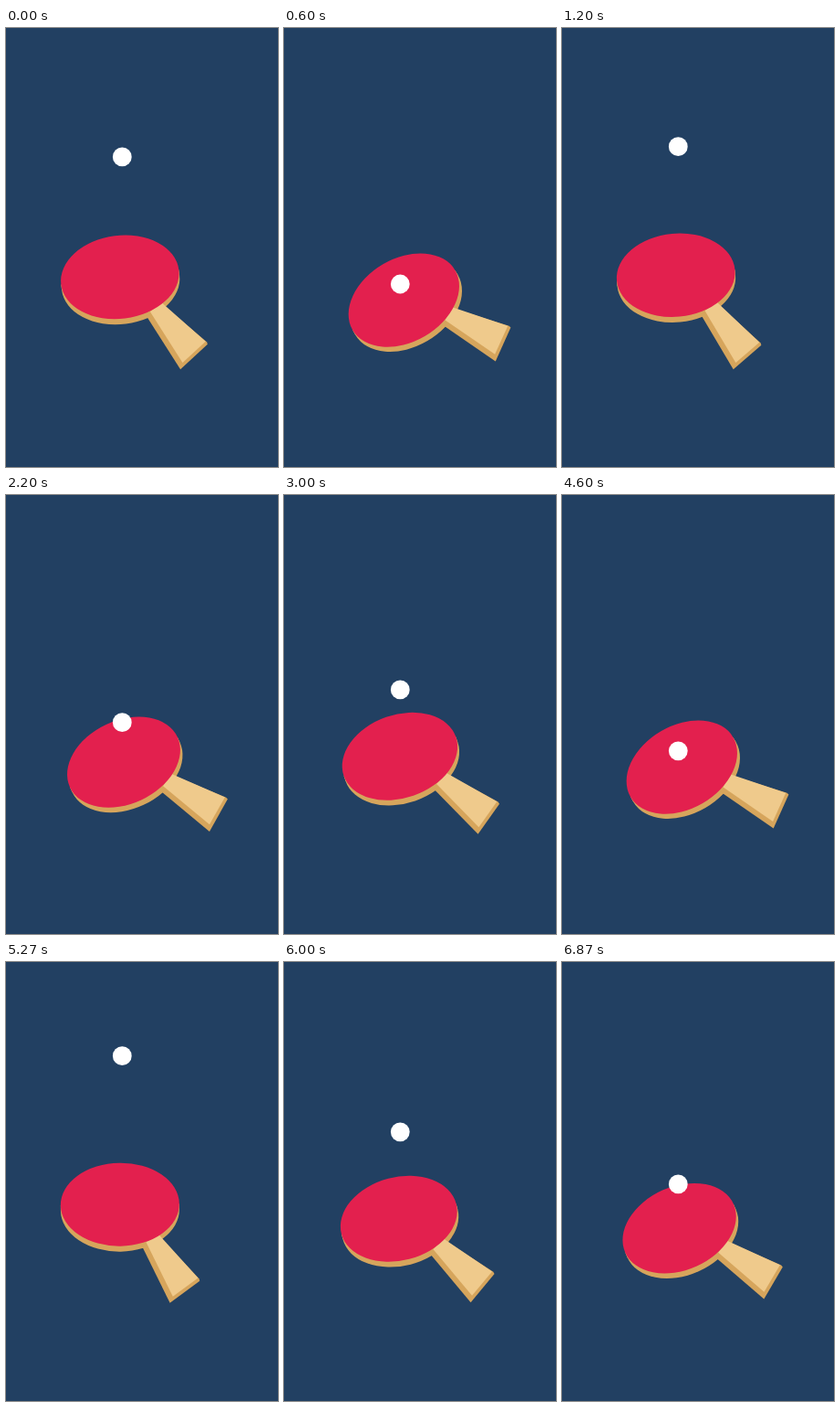
An HTML page that plays this animation: 298 by 480 pixels, repeating every 6.94 s.

```html
<!DOCTYPE html>
<html lang="en">
<head>
<meta charset="utf-8">
<title>Table tennis bounce</title>
<style>
  html, body { margin: 0; width: 100%; height: 100%; overflow: hidden; background: #224062; }
  svg { display: block; width: 100%; height: 100%; }
</style>
</head>
<body>
<svg viewBox="0 0 298 480">
  <rect width="298" height="480" fill="#224062"/>
  <g id="bat">
    <g fill="#d6a55c">
      <ellipse cx="124.9" cy="270.2" rx="65" ry="45.5"/>
      <rect x="59.9" y="264.2" width="130" height="6"/>
      <path d="M146.5 306L167 299L210.3 346.5L211 349L178 372.6Z"/>
    </g>
    <path d="M153 306L166.3 297L209.2 345.8L181.3 365.6Z" fill="#efca8c"/>
    <ellipse cx="124.9" cy="264.2" rx="65" ry="45.5" fill="#e3204e"/>
  </g>
  <circle id="ball" cx="127.3" cy="94" r="10.4" fill="#fff"/>
</svg>
<script>
  const LOOP = 6940, FPS = 15, FRAMES = 104;
  const HALF = 985;         // ms for one rise or one fall
  const START = 0.407;      // progress of the first fall at time zero
  const TOP = 93.7, BOTTOM = 280;
  const PIVOT = '190 269';
  const bat = document.getElementById('bat');
  const ball = document.getElementById('ball');

  const easeInOut = (x, power = 3.3) =>
    x < 0.5 ? (2 * x) ** power / 2 : 1 - (2 - 2 * x) ** power / 2;

  function draw(time) {
    const frame = Math.min(FRAMES - 1, Math.floor((time % LOOP + 5) * FPS / 1000));
    const phase = (START + frame * 1000 / FPS / HALF) % 2;
    const drop = easeInOut(phase < 1 ? phase : 2 - phase);
    ball.setAttribute('cy', TOP + (BOTTOM - TOP) * drop);
    bat.setAttribute('transform', `rotate(${0.6 - 30.8 * drop} ${PIVOT})`);
  }

  const begin = performance.now();
  function tick() {
    draw(performance.now() - begin);
    requestAnimationFrame(tick);
  }
  tick();
</script>
</body>
</html>
```
